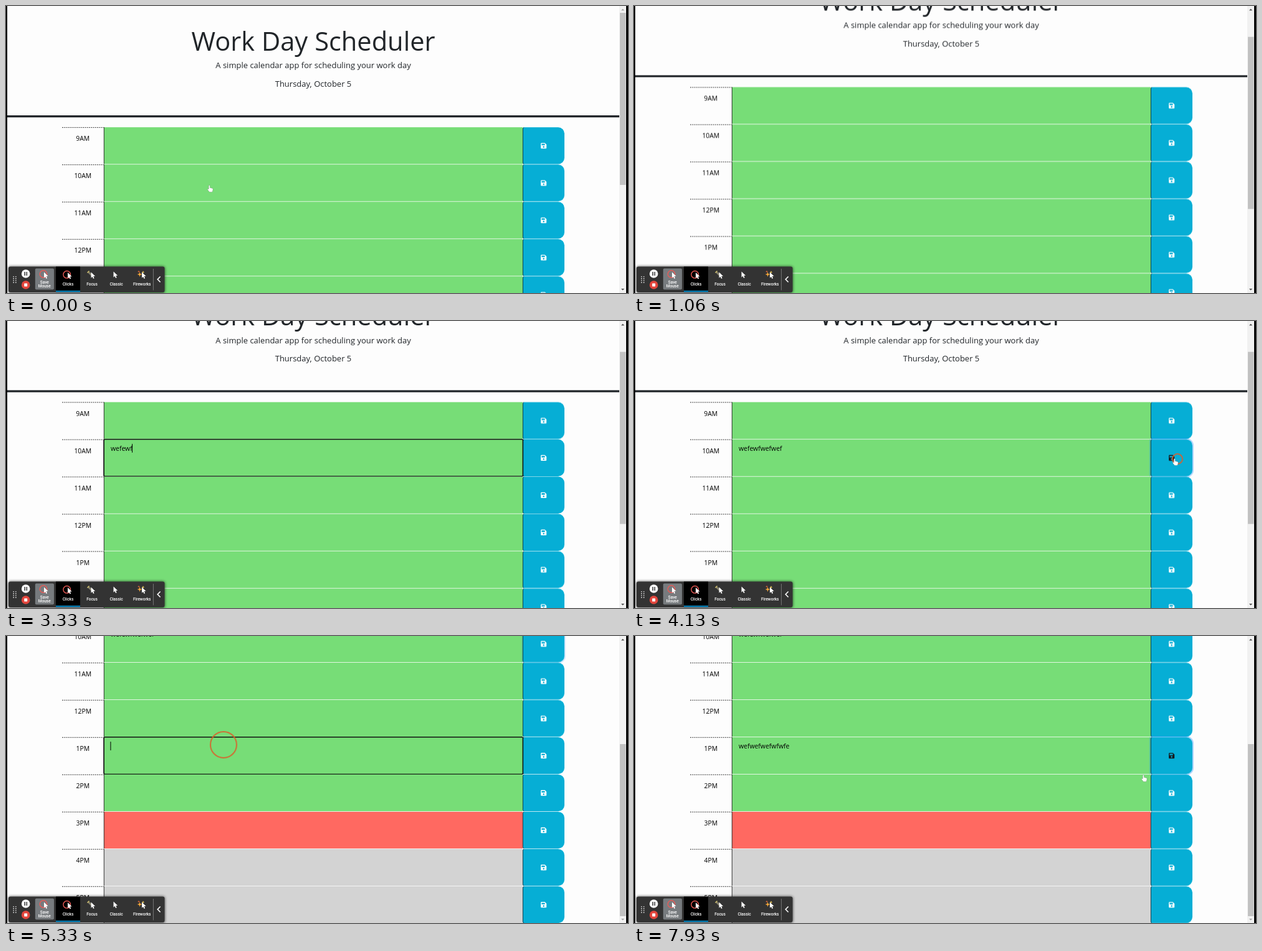
These frames come from a looping animation (998x462 px, 8 s). An HTML page:

```html
<!DOCTYPE html>
<html lang="en">
<head>
<meta charset="utf-8">
<title>Work Day Scheduler</title>
<style>
html, body { margin: 0; width: 100%; height: 100%; overflow: hidden; background: #fdfdfd; }
svg { display: block; width: 998px; height: 462px; }
text { font-family: "Open Sans", "Noto Sans", sans-serif; font-size: 10.4px; fill: #000; white-space: pre; }
.mid { text-anchor: middle; }
.head { fill: #212529; }
.tool { font: 500 6.5px Roboto, Arial, sans-serif; fill: #fff; text-anchor: middle; }

#page, #thumb, #hand, #up, #down, .ring, .icon, .glow { animation: 8s linear infinite; }
#page { animation-name: scroll; animation-timing-function: ease-in-out; }
#thumb { animation-name: thumb; animation-timing-function: ease-in-out; }
#hand { animation-name: hand; }
#up { animation-name: up; }
#down { animation-name: down; }
.icon { fill: #fff; }
.glow { fill: none; stroke: #007bff; stroke-width: 4.2; opacity: 0; }
.r1 .icon { animation-name: hover1; }
.r4 .icon { animation-name: hover4; }
.r1 .glow { animation-name: glow1; }
.r4 .glow { animation-name: glow4; }
.ring { animation-name: ring; fill: none; stroke: #dc5f2c; stroke-width: 2; vector-effect: non-scaling-stroke; opacity: 0; }

@keyframes scroll {
  0%, 10.4% { transform: translateY(0); }
  13.2%, 57.1% { transform: translateY(-64.6px); }
  63.2%, 100% { transform: translateY(-272.3px); }
}
@keyframes thumb {
  0%, 10.4% { transform: translateY(0); }
  13.2%, 57.1% { transform: translateY(38.7px); }
  63.2%, 100% { transform: translateY(163px); }
}
@keyframes up {
  0%, 10.6% { fill: #a3a3a3; }
  10.7%, 100% { fill: #505050; }
}
@keyframes down {
  0%, 63% { fill: #505050; }
  63.1%, 100% { fill: #a3a3a3; }
}
@keyframes hand {
  0%, 1.2% { transform: translate(328px, 294px); opacity: 1; }
  1.21% { transform: translate(328px, 294px); opacity: 0; }
  50% { transform: translate(850px, 231px); opacity: 0; }
  50.01% { transform: translate(850px, 231px); opacity: 1; }
  51.6%, 53.8% { transform: translate(869px, 227px); opacity: 1; }
  55%, 55.7% { transform: translate(819px, 230px); opacity: 1; }
  55.71% { transform: translate(819px, 230px); opacity: 0; }
  84% { transform: translate(840px, 224px); opacity: 0; }
  84.01% { transform: translate(840px, 224px); opacity: 1; }
  86.6%, 98.2% { transform: translate(872px, 210px); opacity: 1; }
  99.1%, 100% { transform: translate(819px, 229px); opacity: 1; }
}
@keyframes ring {
  0% { transform: scale(0); opacity: .9; }
  1.06% { transform: scale(1); opacity: .9; }
  2%, 100% { transform: scale(1); opacity: 0; }
}
@keyframes hover1 {
  0%, 50.3% { fill: #fff; }
  51.3%, 55% { fill: #16191c; }
  56.5%, 100% { fill: #fff; }
}
@keyframes hover4 {
  0%, 84.2% { fill: #fff; }
  86%, 100% { fill: #16191c; }
}
@keyframes glow1 {
  0%, 51.2% { opacity: 0; }
  51.6%, 65.8% { opacity: .28; }
  67.6%, 100% { opacity: 0; }
}
@keyframes glow4 {
  0%, 88.1% { opacity: 0; }
  89.5%, 100% { opacity: .28; }
}
</style>
</head>
<body>
<svg viewBox="0 0 998 462">
  <defs>
    <path id="button" d="M831.6 0H886a10 10 0 0 1 10 10v39.3a10 10 0 0 1-10 10H831.6a2.6 2.6 0 0 1-2.6-2.6V2.6a2.6 2.6 0 0 1 2.6-2.6z"/>
    <path id="disk" fill-rule="evenodd" d="M1 0H6.5L9.1 2.6V8.1a1 1 0 0 1-1 1H1a1 1 0 0 1-1-1V1a1 1 0 0 1 1-1zM1.3 1.3V3.9H6.5V1.3zM4.55 5.2a1.3 1.3 0 1 0 .01 0z"/>
    <path id="arrow" d="M0 0V9.2L2.1 7.2 3.5 10.4 5.1 9.7 3.7 6.6H6.6z"/>
    <path id="spark" d="M0-4 1-1 4 0 1 1 0 4-1 1-4 0-1-1z"/>
    <filter id="blur" x="-10%" y="-30%" width="120%" height="160%"><feGaussianBlur stdDeviation="2"/></filter>
  </defs>

  <rect width="998" height="462" fill="#fdfdfd"/>
  <g id="page">
    <text class="mid head" x="493" y="71.7" style="font-size:41.6px">Work Day Scheduler</text>
    <text class="mid head" x="493" y="100.2" style="font-size:13px">A simple calendar app for scheduling your work day</text>
    <text class="mid head" x="493" y="130" style="font-size:13px">Thursday, October 5</text>
    <rect x="2" y="176" width="982" height="3.3" fill="#212529"/>
    <g id="rows"></g>
  </g>

  <rect x="984" width="11" height="462" fill="#f1f1f1"/>
  <rect id="thumb" x="985" y="11" width="9.5" height="277" fill="#c1c1c1"/>
  <path id="up" d="M987 7.2 989.6 4.4 992.2 7.2z"/>
  <path id="down" d="M987 455 989.6 457.8 992.2 455z"/>
  <path d="M0 0H2V462H0zM995 0H998V462H995z"/>

  <g id="toolbar">
    <rect x="3.5" y="419" width="251.5" height="43" rx="4" opacity=".6" filter="url(#blur)"/>
    <rect x="4" y="419.5" width="250.5" height="41.5" rx="3" fill="#333"/>
    <path d="M12.2 435V446M15.8 435V446" stroke="#ccc" stroke-width="1.6" stroke-dasharray="1.6 1.5"/>
    <circle cx="31.7" cy="431" r="6.8" fill="#fff"/>
    <path d="M30.2 428V434M33.3 428V434" stroke="#333" stroke-width="1.5"/>
    <circle cx="31.7" cy="449" r="6.8" fill="#e2453c"/>
    <rect x="29.2" y="446.5" width="5" height="5" rx=".6" fill="#fff"/>
    <rect x="46.8" y="422.5" width="30.2" height="34" rx="2" fill="#777b7e"/>
    <rect x="80" y="419.5" width="39" height="41.5" fill="#000"/>
    <rect x="80" y="458.3" width="39" height="2" fill="#0e9bdc"/>
    <g fill="none" stroke="#ea5a55" stroke-width="1.4">
      <circle cx="60" cy="431.5" r="5.8"/>
      <circle cx="97.7" cy="432.3" r="5.8"/>
    </g>
    <path d="M131.5 427.5 137 433" stroke="#85806a" stroke-width="3"/>
    <path d="M130.5 429.5 133.5 426.5" stroke="#d8c66a" stroke-width="1.2"/>
    <use href="#spark" x="214.5" y="432" fill="#f5a83a"/>
    <use href="#spark" transform="translate(220 428.5) scale(.6)" fill="#ffd75a"/>
    <use href="#spark" transform="translate(213 427.5) scale(.5)" fill="#ea6a3c"/>
    <g fill="#fff">
      <use href="#arrow" x="61" y="428.5"/>
      <use href="#arrow" x="99" y="429"/>
      <use href="#arrow" x="136.5" y="428.5"/>
      <use href="#arrow" x="172.5" y="427.5"/>
      <use href="#arrow" x="218" y="428.5"/>
    </g>
    <text class="tool" x="61.8" y="446.6">Save</text>
    <text class="tool" x="61.8" y="453.3">Mouse</text>
    <text class="tool" x="99.5" y="450.4">Clicks</text>
    <text class="tool" x="138" y="450.4">Focus</text>
    <text class="tool" x="177" y="450.4">Classic</text>
    <text class="tool" x="218.2" y="450.4">Fireworks</text>
    <path d="M236.4 423V457.5" stroke="#777" stroke-width="1"/>
    <path d="M247.6 435.5 243.2 440 247.6 444.5" fill="none" stroke="#fff" stroke-width="1.6"/>
  </g>

  <g id="rings"></g>
  <path id="hand" fill="#fff" stroke="#333" stroke-opacity=".45" stroke-width=".5"
    d="M-2.7-4.6a1 1 0 0 1 2 0V-1.4L3-.6Q4.3-.2 4.1 1.1L3.5 3.9Q3.2 5.4 2 5.4H-.9Q-1.8 5.4-2.4 4.5L-4.6 1.4Q-5 .3-4 .2L-2.7.9z"/>
</svg>
<script>
const LOOP = 8000;
const byId = id => document.getElementById(id);
const hours = ['9AM', '10AM', '11AM', '12PM', '1PM', '2PM', '3PM', '4PM', '5PM'];
const shade = i => i < 6 ? '#77dd77' : i === 6 ? '#ff6961' : '#d3d3d3';

byId('rows').innerHTML = hours.map((hour, i) => `
  <g class="r${i}" transform="translate(0 ${195.2 + 60 * i})">
    <path d="M90 .4H157" stroke="#222" stroke-width=".9" stroke-dasharray="2 1.3"/>
    <text class="mid" x="123.3" y="22.3">${hour}</text>
    <rect x="157" width="672" height="59.2" fill="${shade(i)}"/>
    <rect x="156.8" width=".9" height="59.2" fill="#222"/>
    <text class="note" x="168" y="18"></text>
    <rect class="caret" y="7.2" width="1" height="14" visibility="hidden"/>
    <use class="glow" href="#button"/>
    <use href="#button" fill="#06aed5"/>
    <path d="M831 .4Q829.4.6 829.4 2.6V56.7Q829.4 58.7 831 58.9" fill="none" stroke="#0b3440" stroke-width=".9"/>
    <use class="icon" href="#disk" x="858.1" y="25.2"/>
    <rect class="outline" x="157" y="-.2" width="672.4" height="59.7" rx="1.8" fill="none" stroke="#101010" stroke-width="1.5" visibility="hidden"/>
  </g>`).join('');

// Each click: x, y, time
byId('rings').innerHTML = [[326, 222, 2110], [872, 222, 4100], [349, 175, 5250], [871, 206, 7040]]
  .map(([x, y, at]) => `<g transform="translate(${x} ${y})"><circle class="ring" r="22" style="animation-delay:${at}ms"/></g>`)
  .join('');

const notes = [
  { row: 1, text: 'wefewfwefwef', focus: 2130, blur: 4110, start: 2930, step: 72 },
  { row: 4, text: 'wefwefwefwfwfe', focus: 5260, blur: 7050, start: 5600, step: 70 }
].map(n => {
  const find = name => document.querySelector(`.r${n.row} .${name}`);
  return { ...n, note: find('note'), caret: find('caret'), outline: find('outline') };
});

const show = (el, on) => el.setAttribute('visibility', on ? 'visible' : 'hidden');

function drawNote(n, t) {
  const typed = Math.floor((t - n.start) / n.step) + 1;
  const count = Math.max(0, Math.min(n.text.length, typed));
  const focused = t >= n.focus && t < n.blur;
  const lastKey = count ? n.start + (count - 1) * n.step : n.focus;
  n.note.textContent = n.text.slice(0, count);
  show(n.outline, focused);
  show(n.caret, focused && (t - lastKey) % 1060 < 530);
  n.caret.setAttribute('x', 167.4 + (count ? n.note.getComputedTextLength() : 0));
}

let origin;
function frame(now) {
  origin ??= now;
  const t = (now - origin) % LOOP;
  notes.forEach(n => drawNote(n, t));
  requestAnimationFrame(frame);
}
requestAnimationFrame(frame);
</script>
</body>
</html>
```
